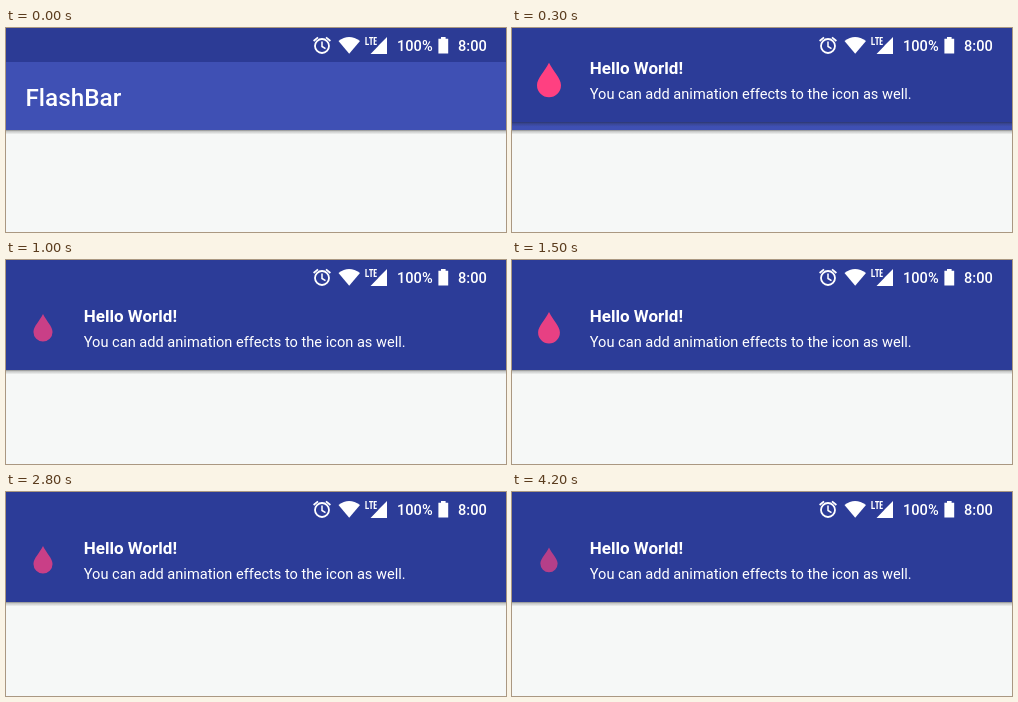
Animation, 500 px wide and 204 px high, one loop 4.3 s. Source, as an HTML page:

```html
<!DOCTYPE html>
<html lang="en">
<head>
<meta charset="utf-8">
<title>FlashBar</title>
<style>
  html, body { margin: 0; width: 100%; height: 100%; overflow: hidden; background: #f6f8f7; }
  svg { display: block; width: 500px; height: 204px; font-family: Roboto, sans-serif; fill: #fff; }
</style>
</head>
<body>
<svg viewBox="0 0 500 204">
  <defs>
    <linearGradient id="shade" x2="0" y2="1">
      <stop offset="0" stop-color="#222" stop-opacity=".6"/>
      <stop offset=".4" stop-color="#222" stop-opacity=".22"/>
      <stop offset="1" stop-color="#222" stop-opacity="0"/>
    </linearGradient>
  </defs>

  <g id="toolbar">
    <rect y="101.5" width="500" height="5" fill="url(#shade)"/>
    <rect width="500" height="102" fill="#3f50b4"/>
    <rect width="500" height="34" fill="#2c3b95"/>
    <text x="19.5" y="77.5" font-size="24.3" font-weight="500">FlashBar</text>
  </g>

  <g id="bar">
    <rect y="109.5" width="500" height="5" fill="url(#shade)"/>
    <rect width="500" height="110" fill="#2c3c98"/>
    <path id="drop" fill="#ff4081" d="M37 50.5C33 59 25 66 25 73a12 12 0 0 0 24 0C49 66 41 59 37 50.5z"/>
    <text x="77.8" y="62" font-size="17" font-weight="700">Hello World!</text>
    <text x="77.8" y="87" font-size="14.6">You can add animation effects to the icon as well.</text>
  </g>

  <g id="status">
    <g fill="none" stroke="#fff" stroke-width="1.8">
      <circle cx="316" cy="18" r="7"/>
      <path stroke-width="1.5" d="M316 13.5V18.5L319.5 20.7"/>
      <path d="M307.6 13L312 9.4M324.4 13L320 9.4"/>
      <path stroke-width="1.3" d="M360 9V16.4H363M363 9.6H367.2M365.1 9.6V17M370.8 9.6H368.3V16.4H370.8M368.3 12.9H370.5"/>
    </g>
    <path d="M332.5 13Q343 5 354 13L343.2 25.8z"/>
    <path d="M381 9V26H364.5L372.5 17.8V17.5z"/>
    <path d="M435 9h4.6v1.8h2.6V25.6H432.4V10.8H435z"/>
    <text x="391" y="23" font-size="14.6" font-weight="500">100%</text>
    <text x="452" y="23" font-size="14.6" font-weight="500">8:00</text>
  </g>
</svg>
<script>
const LOOP = 4300, STEP = 100, ENTER = 395, PULSE_START = 400, HALF_PULSE = 750;
const bar = document.getElementById('bar');
const drop = document.getElementById('drop');

const easeInOut = p => (1 - Math.cos(Math.PI * p)) / 2;

// Accelerating shrink that plays forwards, then in reverse.
function pulse(t) {
  const phase = Math.max(0, t - PULSE_START) % (2 * HALF_PULSE);
  return (Math.min(phase, 2 * HALF_PULSE - phase) / HALF_PULSE) ** 2;
}

function draw(t) {
  const hidden = 1 - easeInOut(Math.min(1, t / ENTER));
  bar.setAttribute('transform', `translate(0 ${-116 * hidden})`);
  const p = pulse(t);
  drop.setAttribute('transform', `translate(37 68) scale(${1 - 0.32 * p}) translate(-37 -68)`);
  drop.setAttribute('opacity', 1 - 0.4 * p);
}

const start = performance.now();
function tick() {
  const t = (performance.now() - start) % LOOP;
  draw(Math.floor(t / STEP) * STEP);
  requestAnimationFrame(tick);
}
tick();
</script>
</body>
</html>
```
